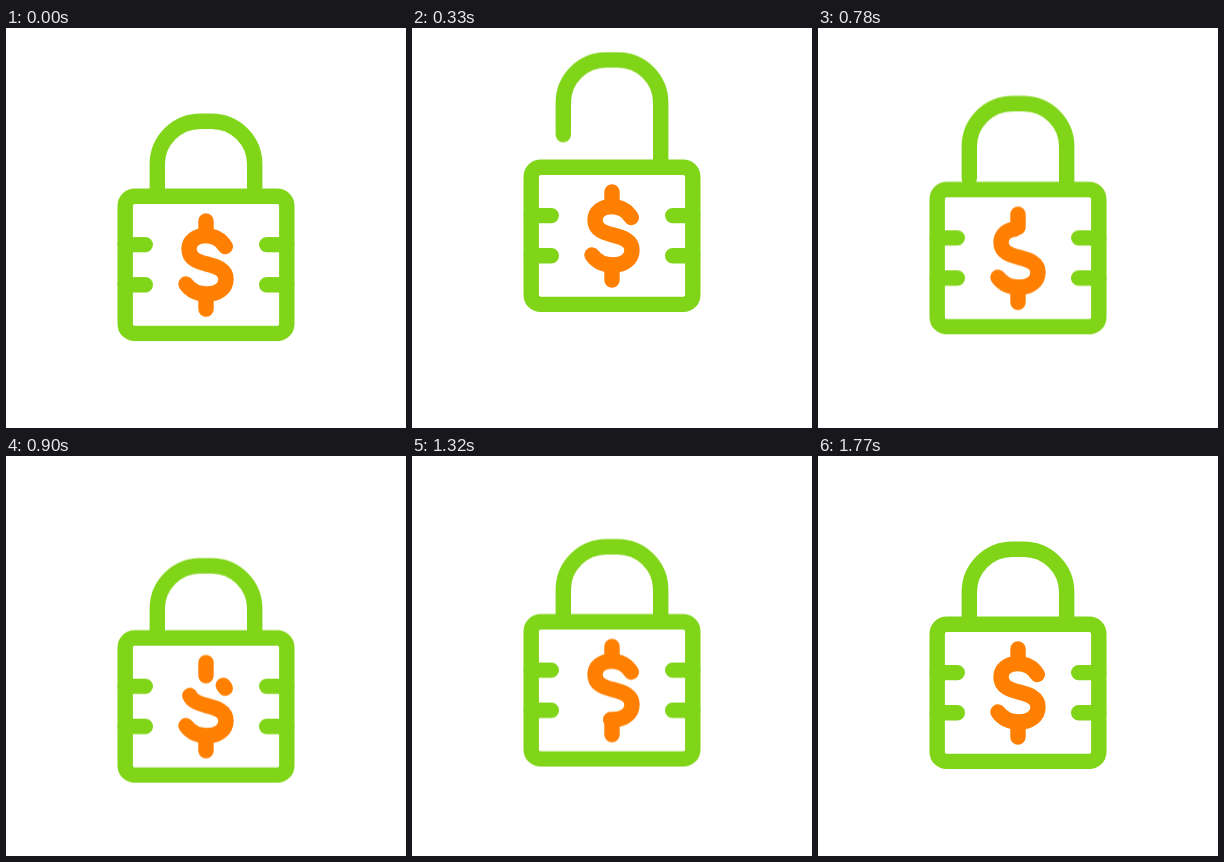
Animation of 400 by 400 pixels, one loop 2.36 s. Source, as an HTML page:

```html
<!DOCTYPE html>
<html lang="en">
<head>
<meta charset="utf-8">
<title>Padlock</title>
<style>
  html, body { margin: 0; width: 100%; height: 100%; overflow: hidden; background: #fff; }
  svg { display: block; width: 100%; height: 100%; }

  .line { fill: none; stroke: #80d518; stroke-width: 15.4; stroke-linecap: round; stroke-linejoin: round; }
  .money { stroke: #ff7f00; }

  .lock, .shackle, .fade, .draw { animation: 2360ms linear infinite; }
  .lock { animation-name: jump; }
  .shackle { animation-name: open; }
  .fade { stroke-dasharray: 100 300; animation-name: fade; }
  .draw { stroke-dasharray: 0 300; animation-name: draw; }

  /* crouch, leap, land, small rebound */
  @keyframes jump {
    0% { transform: translateY(0); animation-timing-function: ease-in-out; }
    2.97% { transform: translateY(14px); animation-timing-function: cubic-bezier(.25, .1, .3, 1); }
    20.34% { transform: translateY(-34px); animation-timing-function: cubic-bezier(.7, 0, .75, .9); }
    37.92% { transform: translateY(13.7px); animation-timing-function: cubic-bezier(.36, 0, .64, 1); }
    52.12% { transform: translateY(-3.3px); animation-timing-function: cubic-bezier(.36, 0, .64, 1); }
    63.56%, 100% { transform: translateY(0); }
  }

  @keyframes open {
    0%, 7.63% { transform: translateY(0); animation-timing-function: cubic-bezier(.33, 0, .4, 1); }
    16.95%, 27.12% { transform: translateY(-36.5px); animation-timing-function: ease-in-out; }
    37.29% { transform: translateY(3px); animation-timing-function: ease-in-out; }
    42.37%, 100% { transform: translateY(0); }
  }

  /* the S is wiped from its start, then drawn again behind the wipe */
  @keyframes fade {
    0%, 22.88% { stroke-dashoffset: 0; opacity: 1; animation-timing-function: cubic-bezier(.4, .05, .8, .85); }
    54.66% { stroke-dashoffset: -100; opacity: 1; }
    54.67%, 100% { stroke-dashoffset: -100; opacity: 0; }
  }

  @keyframes draw {
    0%, 35.58% { stroke-dasharray: 0 300; opacity: 0; }
    35.59% { stroke-dasharray: 0 300; opacity: 1; animation-timing-function: cubic-bezier(.36, 0, .64, 1); }
    62.71%, 100% { stroke-dasharray: 100 300; opacity: 1; }
  }
</style>
</head>
<body>
<svg viewBox="0 0 400 400">
  <defs>
    <clipPath id="above"><rect x="100" y="-100" width="200" height="272"/></clipPath>
    <path id="ess" pathLength="100" d="M219.3 218.5C215 211.5 208 207.6 199.5 207.6C190 207.6 183 213 183 221C183 231 192 233.6 201 236C211 238.6 220 241.500 220 251C220 261 211 266 201 266C192 266 185 263 180 256"/>
  </defs>
  <g class="lock">
    <g clip-path="url(#above)">
      <path class="line shackle" d="M151.300 168V136A43 43 0 0 1 194.300 93.200H205.700A43 43 0 0 1 248.700 136V212"/>
    </g>
    <rect class="line" x="119.200" y="168.200" width="161.600" height="137.200" rx="9.500"/>
    <path class="line" d="M119.200 216.600H139.300M119.200 256.700H139.300M280.800 216.600H260.700M280.800 256.700H260.700"/>
    <path class="line money" d="M200 193V206M200 267V281"/>
    <use href="#ess" class="line money fade"/>
    <use href="#ess" class="line money draw"/>
  </g>
</svg>
</body>
</html>
```
